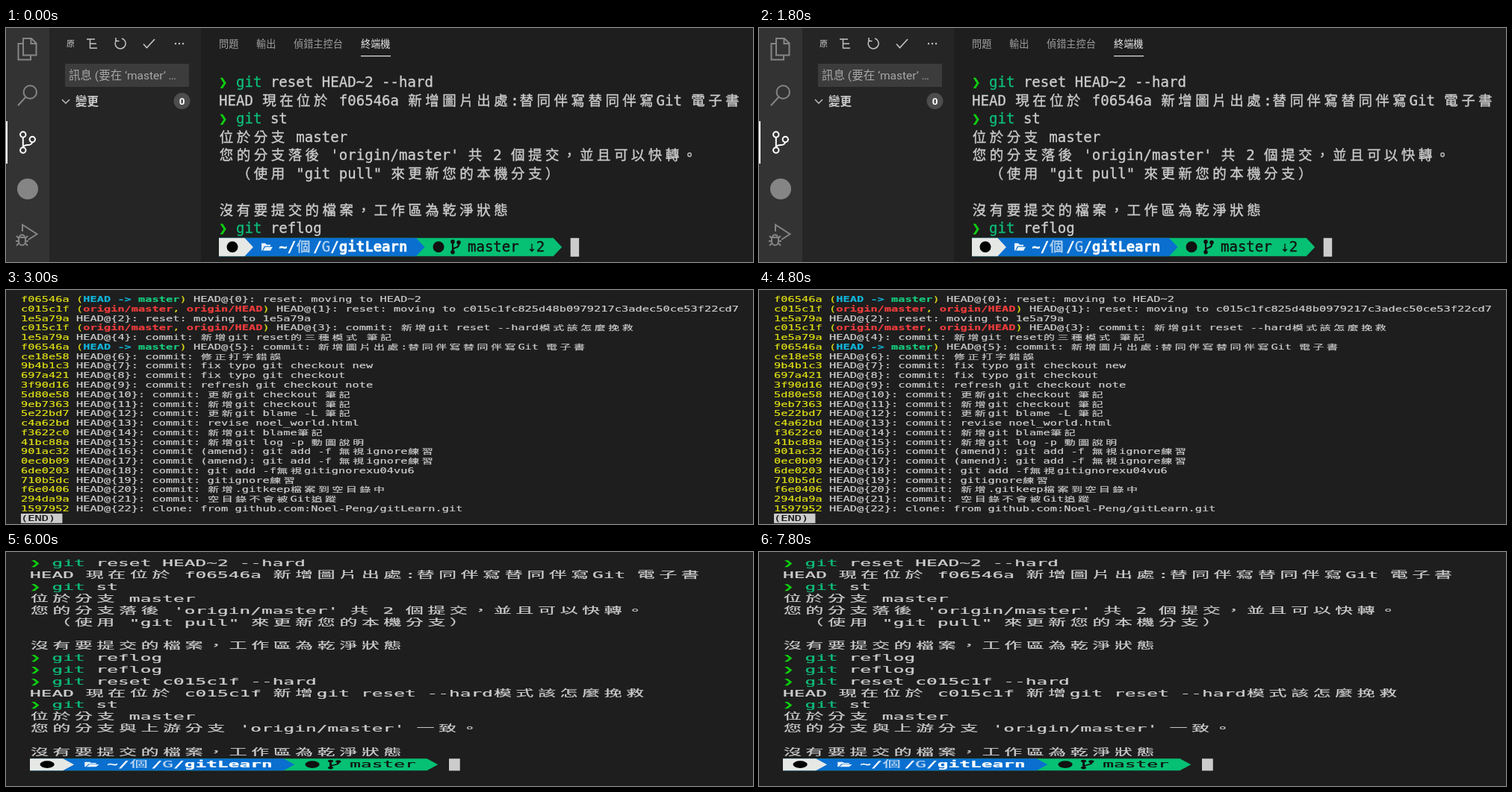
Recreate the animation shown at these times as an HTML page with a canvas. Size 1000 by 314 pixels, loop 9000 ms.

```html
<!DOCTYPE html>
<html lang="zh-Hant">
<head>
<meta charset="utf-8">
<style>
html, body { margin: 0; height: 100%; overflow: hidden; background: #1e1e1e; }
canvas { display: block; }
</style>
</head>
<body>
<canvas id="stage" width="1000" height="314"></canvas>
<script>
const ctx = document.getElementById('stage').getContext('2d');
const MONO = '"DejaVu Sans Mono", "Noto Sans CJK TC", monospace';
const CJK = '"Noto Sans CJK TC", "Noto Sans CJK", sans-serif';
const UI = 'Roboto, ' + CJK;
const CELL = 11.48, ROW = 24.5, BASE = 18.5;
const FG = '#cccccc', BG = '#1e1e1e';

// A "§" plus a key switches the style: [colour, weight]
const STYLES = {
  w: [FG, ''], g: ['#0dbc79', ''], a: ['#10d010', 'bold'], y: ['#dede14', ''],
  C: ['#11b4d8', 'bold'], G: ['#17c97c', 'bold'], R: ['#f13c3c', 'bold'],
  k: ['#111111', ''], W: ['#ffffff', 'bold'], d: ['#b5d3ef', '']
};

const command = s => '§a❯ §ggit§w ' + s;
const opening = [
  command('reset HEAD~2 --hard'),
  'HEAD 現在位於 f06546a 新增圖片出處:替同伴寫替同伴寫Git 電子書',
  command('st'),
  '位於分支 master',
  "您的分支落後 'origin/master' 共 2 個提交，並且可以快轉。",
  '  （使用 "git pull" 來更新您的本機分支）',
  '',
  '沒有要提交的檔案，工作區為乾淨狀態',
  command('reflog')
];
const closing = [
  ...opening,
  command('reflog'),
  command('reset c015c1f --hard'),
  'HEAD 現在位於 c015c1f 新增git reset --hard模式該怎麼挽救',
  command('st'),
  '位於分支 master',
  "您的分支與上游分支 'origin/master' 一致。",
  '',
  '沒有要提交的檔案，工作區為乾淨狀態'
];

const refs = {
  f06546a: '§y(§CHEAD -> §Gmaster§y) ',
  c015c1f: '§y(§Rorigin/master§y, §Rorigin/HEAD§y) '
};
const reflog = [
  'f06546a reset: moving to HEAD~2',
  'c015c1f reset: moving to c015c1fc825d48b0979217c3adec50ce53f22cd7',
  '1e5a79a reset: moving to 1e5a79a',
  'c015c1f commit: 新增git reset --hard模式該怎麼挽救',
  '1e5a79a commit: 新增git reset的三種模式 筆記',
  'f06546a commit: 新增圖片出處:替同伴寫替同伴寫Git 電子書',
  'ce18e58 commit: 修正打字錯誤',
  '9b4b1c3 commit: fix typo git checkout new',
  '697a421 commit: fix typo git checkout',
  '3f90d16 commit: refresh git checkout note',
  '5d80e58 commit: 更新git checkout 筆記',
  '9eb7363 commit: 新增git checkout 筆記',
  '5e22bd7 commit: 更新git blame -L 筆記',
  'c4a62bd commit: revise noel_world.html',
  'f3622c0 commit: 新增git blame筆記',
  '41bc88a commit: 新增git log -p 動圖說明',
  '901ac32 commit (amend): git add -f 無視ignore練習',
  '0ec0b09 commit (amend): git add -f 無視ignore練習',
  '6de0203 commit: git add -f無視gitignorexu04vu6',
  '710b5dc commit: gitignore練習',
  'f6e0406 commit: 新增.gitkeep檔案到空目錄中',
  '294da9a commit: 空目錄不會被Git追蹤',
  '1597952 clone: from github.com:Noel-Peng/gitLearn.git'
].map((s, i) => {
  const hash = s.slice(0, 7);
  return `§y${hash} ${refs[hash] || ''}§wHEAD@{${i}}: ${s.slice(8)}`;
});

function box(color, x, y, w, h) {
  ctx.fillStyle = color;
  ctx.fillRect(x, y, w, h);
}

function dot(color, x, y, r) {
  ctx.fillStyle = color;
  ctx.beginPath();
  ctx.arc(x, y, r, 0, 7);
  ctx.fill();
}

function line(color, width, d) {
  ctx.strokeStyle = color;
  ctx.lineWidth = width;
  ctx.stroke(new Path2D(d));
}

function label(text, x, y, size, color, weight = 500) {
  ctx.font = `${weight} ${size}px ${UI}`;
  ctx.fillStyle = color;
  ctx.fillText(text, x, y);
}

// Writes on the terminal grid; wide characters take two cells.
// A hairline outline gives the slightly heavy terminal look.
function write(text, row, col = 0) {
  let [color, weight] = STYLES.w, key = false;
  ctx.lineWidth = 0.35;
  for (const ch of text) {
    if (key) { [color, weight] = STYLES[ch]; key = false; continue; }
    if (ch === '§') { key = true; continue; }
    const wide = ch.charCodeAt(0) >= 0x2e80;
    const x = col * CELL + (wide ? 0.8 : 0), y = row * ROW + BASE;
    ctx.font = wide ? `18.5px ${CJK}` : `${weight} 19px ${MONO}`;
    ctx.fillStyle = ctx.strokeStyle = color;
    ctx.fillText(ch, x, y);
    ctx.strokeText(ch, x, y);
    col += wide ? 2 : 1;
  }
}

// Powerline segment from the left edge to a pointed end at a column.
function segment(color, end, y) {
  const x = end * CELL;
  ctx.fillStyle = color;
  ctx.beginPath();
  ctx.moveTo(0, y);
  ctx.lineTo(x, y);
  ctx.lineTo(x + CELL, y + ROW / 2);
  ctx.lineTo(x, y + ROW);
  ctx.lineTo(0, y + ROW);
  ctx.fill();
}

function prompt(row, branch) {
  const y = row * ROW + 0.8, end = 30 + branch.length;
  segment('#06c074', end, y);
  segment('#0a6fcf', 23, y);
  segment('#e6e8e6', 3, y);
  dot('#000', 18, y + 12, 7.5);
  ctx.fillStyle = '#e8f2fb';
  ctx.fill(new Path2D(`M57 ${y + 17}v-10h5l2 2h5v2h-8l-3 6zM59 ${y + 17}l3-5h10l-3 5z`));
  write('§W~/§d個§W/§dG§W/gitLearn', row, 7);
  dot('#111', 294, y + 12, 7.5);
  line('#111', 2.2, `M313 ${y + 6}v12M321 ${y + 7}v2q0 3 -4 4q-4 1 -4 4`);
  for (const [x, dy] of [[313, 5], [321, 6], [313, 19]]) dot('#111', x, y + dy, 2.8);
  write('§k' + branch, row, 29);
  box(FG, (end + 2) * CELL, y, CELL, ROW + 0.5);
}

function terminal(x, y, sx, sy, rows, extra) {
  ctx.save();
  ctx.translate(x, y);
  ctx.scale(sx, sy);
  rows.forEach((s, i) => write(s, i));
  extra(rows.length);
  ctx.restore();
}

function editor() {
  const grey = '#858585', pale = '#c5c5c5';
  box('#333333', 0, 0, 58, 314);
  box('#252526', 58, 0, 203, 314);
  box('#ffffff', 0, 125, 2, 57);

  line(grey, 2, 'M23 21H16.5V42.5H33V37M23 14H34L40.5 20.5V36.5H23ZM33.5 14V21H40.5');
  line(grey, 2, 'M41 86a8.7 8.7 0 1 0 -17.4 0a8.7 8.7 0 1 0 17.4 0M26.5 92.5L16 104');
  line('#fff', 2, 'M26.5 143a3.7 3.7 0 1 0 -7.4 0a3.7 3.7 0 1 0 7.4 0M26.5 164a3.7 3.7 0 1 0 -7.4 0a3.7 3.7 0 1 0 7.4 0M39 149.5a3.7 3.7 0 1 0 -7.4 0a3.7 3.7 0 1 0 7.4 0M22.8 147V160M35.3 153.5Q34 157 29 157Q24 157 22.8 160');
  dot(grey, 29, 216, 14);
  line(grey, 2, 'M22 273V264L41.5 276.5L30 284M17 281h9v5a4.5 5.5 0 0 1 -9 0zM18 281a3.5 3.5 0 0 1 7 0M14 279l3 3M29 279l-3 3M13 286h4M26 286h4M14 292l3 -3M29 292l-3 -3');

  label('原', 81, 25, 11, FG);
  line(pale, 1.4, 'M108 15h11M112 21h9M112 27h10M112.5 15v12');
  line(pale, 1.5, 'M148 16a7 7 0 1 0 7 -2M147 13v4.5h4.5');
  line(pale, 1.6, 'M184 21.5l4.5 5L199 15');
  for (const x of [227, 232, 237]) dot(pale, x, 21, 1.2);

  box('#3c3c3c', 79, 48, 166, 31);
  label('訊息 (要在 ‘master’ …', 84, 69, 15.5, '#a8a8a8', 400);
  line(pale, 1.4, 'M75 96l5 5l5 -5');
  label('變更', 93, 104, 15.5, FG, 'bold');
  dot('#4d4d4d', 235.5, 98, 11);
  label('0', 231.7, 103, 13.5, '#fff', 'bold');

  label('問題', 285, 26, 13.2, '#9c9c9c');
  label('輸出', 335, 26, 13.2, '#9c9c9c');
  label('偵錯主控台', 385, 26, 13.2, '#9c9c9c');
  label('終端機', 475, 26, 13.2, '#e7e7e7');
  box('#e7e7e7', 475, 37, 40, 1.2);

  terminal(285, 60.5, 1, 1, opening, row => prompt(row, 'master ⇣2'));
}

function history() {
  terminal(20, 6.5, 0.805, 0.521, reflog, row => {
    box(FG, 0, row * ROW, CELL * 6, ROW);
    write('§k(END)', row);
  });
}

function restored() {
  terminal(32, 7.3, 1.286, 0.647, closing, row => prompt(row, 'master'));
}

const scenes = [editor, history, restored];
let shown = -1;

function tick(now) {
  const scene = Math.floor(now % 9000 / 3000);
  if (scene !== shown) {
    shown = scene;
    box(BG, 0, 0, 1000, 314);
    scenes[scene]();
  }
  requestAnimationFrame(tick);
}
tick(0);
</script>
</body>
</html>
```
